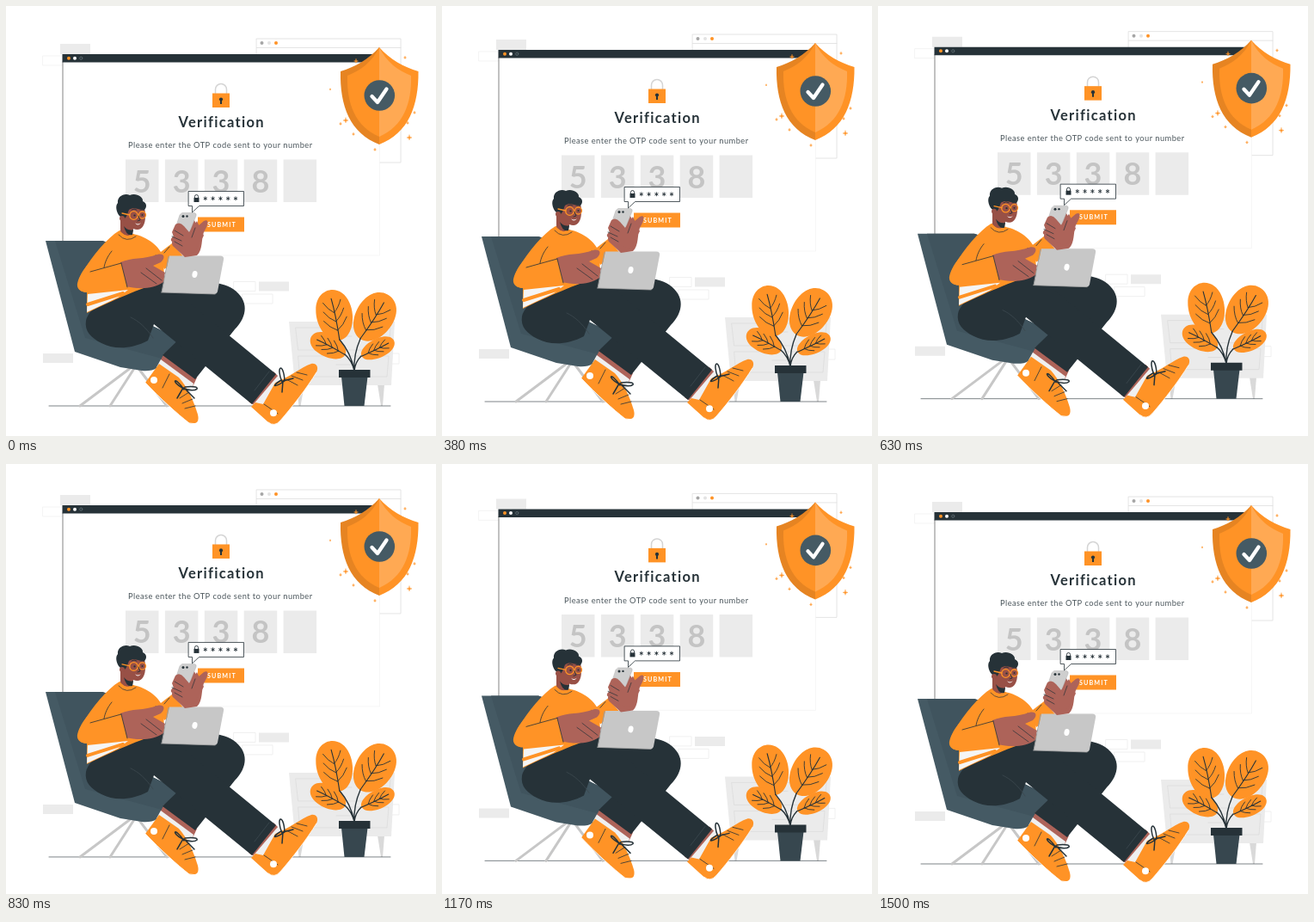
An HTML page with a canvas for the animation above (1.54 s loop, 500x500 px).

```html
<!DOCTYPE html>
<html lang="en">
<head>
<meta charset="utf-8">
<title>Verification</title>
<style>
html, body { margin: 0; width: 100%; height: 100%; overflow: hidden; background: #fff; }
canvas { display: block; width: 100vw; height: 100vh; }
</style>
</head>
<body>
<canvas id="stage" width="500" height="500"></canvas>
<script>
const ctx = document.getElementById('stage').getContext('2d');
const ORANGE = '#ff9326', DARK_ORANGE = '#e68422', LIGHT_ORANGE = '#ffa953';
const INK = '#263238', SLATE = '#37474f', BLUE = '#455a64';
const PALE = '#ebebeb', LINE = '#ececec', GREY = '#c7c7c7';
const SKIN = '#ad6359', FACE = '#985046';
const FRAME = 1000 / 24, HALF = 18, LIFT = 10, PHASE = 0.75, LOOP = 1540;

function shape(d, fill, stroke, width = 1) {
  const path = new Path2D(d);
  if (fill) { ctx.fillStyle = fill; ctx.fill(path); }
  if (stroke) {
    ctx.strokeStyle = stroke;
    ctx.lineWidth = width;
    ctx.stroke(path);
  }
}
const line = (d, color, width) => shape(d, null, color, width);

function rect(x, y, w, h, fill, stroke, width) {
  shape(`M${x} ${y}h${w}v${h}h${-w}Z`, fill, stroke, width);
}

function dot(x, y, r, fill, stroke, width = 1) {
  ctx.beginPath();
  ctx.arc(x, y, r, 0, 7);
  if (fill) { ctx.fillStyle = fill; ctx.fill(); }
  if (stroke) { ctx.strokeStyle = stroke; ctx.lineWidth = width; ctx.stroke(); }
}

function text(str, x, y, font, color, spacing = 0, align = 'left') {
  ctx.font = font + ' Lato, sans-serif';
  ctx.letterSpacing = spacing + 'px';
  ctx.textAlign = align;
  ctx.fillStyle = color;
  ctx.fillText(str, x, y);
}

function backdrop() {
  rect(63, 44, 35, 12, PALE);
  rect(43, 58, 23, 11, null, LINE, 0.6);
  rect(43, 404, 35, 11, PALE);
  rect(291.5, 38, 167.5, 144, '#fff', '#dedede', 0.8);
  line('M291.5 48.5H459', '#dedede', 0.8);
  dot(297.5, 43, 2, '#a6a6a6');
  dot(306, 43, 2, '#e3e3e3');
  dot(314, 43, 2, ORANGE);
  rect(265, 320.5, 25, 11, null, LINE, 0.8);
  rect(275, 335, 35, 11, null, LINE, 0.8);
  rect(430, 404, 27, 12, null, LINE, 0.8);
}

function page() {
  rect(66, 60, 368.5, 230, '#fff');
  line('M434.5 65V290H66', LINE, 0.5);
  line('M66 65V290', '#777', 0.9);
  rect(65.5, 56, 369.5, 9.5, INK);
  dot(73, 60.7, 2, ORANGE);
  dot(80, 60.7, 2, '#fff');
  dot(87.3, 60.7, 1.6, null, '#66747a', 0.8);
  rect(294, 320.5, 35, 11, PALE);

  line('M243.5 102V97A6.5 6.5 0 0 1 256.5 97V102', '#d4d4d4', 1.5);
  rect(240, 101.5, 20, 16.5, ORANGE);
  dot(250, 108.5, 2.1, INK);
  rect(249, 109, 2, 5, INK);

  text('Verification', 200.5, 141, '700 16.5px', INK, 1.3);
  text('Please enter the OTP code sent to your number', 142, 165.3, '9.3px', '#4a555b', 0.45);
  ['5', '3', '3', '8', ''].forEach((digit, i) => {
    const x = 139 + i * 45.9;
    rect(x, 178.5, 38.5, 49.5, PALE);
    text(digit, x + 19.2, 216.5, '700 36px', '#c4c4c4', 0, 'center');
  });
  rect(223, 245.5, 54, 17, ORANGE);
  text('SUBMIT', 234, 256.7, '700 7.2px', '#fff', 1.1);
}

function bubble() {
  shape('M212.5 215.5H276.5V232.5H224.5L216.5 240V232.5H212.5Z', '#fff', INK, 0.8);
  rect(218.5, 223, 6, 5, INK);
  line('M219.5 223V221.5A2 2 0 0 1 223.5 221.5V223', INK, 0.9);
  for (let i = 0; i < 5; i++) {
    const x = 231.8 + i * 8.8;
    for (let a = 0; a < 3; a++) {
      const c = 2 * Math.cos(a * Math.PI / 3 + 0.52), s = 2 * Math.sin(a * Math.PI / 3 + 0.52);
      line(`M${x - c} ${223.8 - s}L${x + c} ${223.8 + s}`, INK, 0.9);
    }
  }
}

function shield() {
  const sparkles = [[395, 133, 3], [469, 153, 3], [389, 137, 1.5], [464, 60, 1.5], [475, 124, 1.5],
    [407, 64, 2.5], [404, 149, 1.5], [467, 136, 1.5], [429, 167, 1.5], [377, 97, 1]];
  for (const [x, y, r] of sparkles)
    shape(`M${x} ${y - r}Q${x} ${y} ${x + r} ${y}Q${x} ${y} ${x} ${y + r}Q${x} ${y} ${x - r} ${y}Q${x} ${y} ${x} ${y - r}Z`, ORANGE, ORANGE, 0.4);
  shape('M434 48C422 62 405 71 389 76C388 116 400 148 434 161Z', DARK_ORANGE);
  shape('M434 48C446 62 463 71 479.5 76C480 116 468 148 434 161Z', ORANGE);
  shape('M434 48C426 65 412 75 397 81C396 113 406 140 434 152Z', ORANGE);
  shape('M434 48C442 65 456 75 471 81C472 113 462 140 434 152Z', LIGHT_ORANGE);
  dot(434.3, 104, 17.8, BLUE);
  line('M425.5 105L432 112L442.5 96.5', '#fff', 4.3);
}

function cabinet() {
  shape('M338 440H347L342.5 465H340.5Z M432 440H440L438 465H436Z', '#d9d9d9');
  shape('M329 367H452L448 441H336Z', PALE);
  line('M337 374H447L445 400H340Z M340 407H445L443 431H342Z', '#dadada', 0.7);
  line('M384 384H402M384 417H400', '#dadada', 0.8);
}

// An egg-shaped leaf with its tip pointing up before rotation.
function leaf(x, y, rx, ry, angle) {
  ctx.save();
  ctx.translate(x, y);
  ctx.rotate(angle);
  shape(`M0 ${ry}C${-rx * 0.75} ${ry} ${-rx * 1.2} ${ry * 0.25} ${-rx} ${-ry * 0.35}`
    + `C${-rx * 0.75} ${-ry * 1.2} ${rx * 0.75} ${-ry * 1.2} ${rx} ${-ry * 0.35}`
    + `C${rx * 1.2} ${ry * 0.25} ${rx * 0.75} ${ry} 0 ${ry}Z`, ORANGE);
  line(`M0 ${ry}Q${rx * 0.08} 0 0 ${-ry * 0.65}`, INK, 1.1);
  for (let i = 0; i < 3; i++) {
    const base = ry * (0.6 - i * 0.35), reach = rx * (0.68 - i * 0.08);
    for (const side of [-1, 1])
      line(`M0 ${base}Q${side * reach * 0.6} ${base - ry * 0.15} ${side * reach} ${base - ry * 0.45}`, INK, 0.8);
  }
  ctx.restore();
}

function plant() {
  leaf(382, 359.5, 20, 30, -0.2);
  leaf(428.5, 361.5, 21, 30.5, 0.58);
  leaf(374.5, 395, 12.5, 22.5, -1.08);
  leaf(432.5, 398, 10.5, 21, 1.12);
  line('M388 388Q401 403 405 424M412 387Q404 405 405 424M394 405Q402 412 405 424M413 407Q406 414 405 424', INK, 1.4);
  shape('M390 431H420.5L416.5 465H393.5Z', SLATE);
  rect(387, 423, 36.5, 9, INK);
}

function chair() {
  line('M146 420L86 465M150 420L121 465M153 420L187 465', GREY, 3);
  shape('M46 273H112Q119 274 120 281L146 360L207 390L175 421Q169 425 158 424L133 420L80 402Z', BLUE);
  shape('M57 273H112Q119 274 120 281L146 360L207 390L185 411L92 386Z', '#40545e');
}

function shoes() {
  shape('M184 404L222 432L217 443L178 415Z', SKIN);
  shape('M180 411L218 439L215 450L175 420Z', '#f0f0f0');
  shape('M178 416L201 432C210 442 218 458 223 475C225 483 222 487 213 485C199 474 180 457 162 438Z', ORANGE);
  line('M162 438C180 457 199 474 213 485L223 486', '#fff', 0.9);
  line('M190 428L182 444M202 456L213 449M205 462L217 457M208 468L220 465', INK, 0.8);
  dot(172, 435, 4, '#fff');
  line('M207 446C195 429 192 437 205 444C222 452 232 440 208 443M206 444L199 456M207 444L219 456', INK, 1.5);

  shape('M311 425L317 431L291 466L282 460Z', SKIN);
  shape('M316 430L324 436L299 470L287 464Z', '#f0f0f0');
  shape('M313 438C329 432 343 420 355 416C361 415 364 420 361 426C350 444 333 466 319 482Q312 490 305 484L285 466L290 461L299 463Z', ORANGE);
  line('M361 426C350 444 333 466 319 482Q312 490 305 484', '#fff', 0.8);
  line('M300 463L316 474M326 434L339 441M332 430L345 435M338 426L350 429', INK, 0.8);
  dot(311, 473.3, 4, '#fff');
  line('M321 437C313 418 323 414 324 436C314 443 306 444 320 435M322 436L334 433M322 436L321 449', INK, 1.5);
}

function legs() {
  shape('M185 338C210 319 246 317 264 329C283 342 281 361 266 376L220 434L182 406L215 374Z', INK);
  shape('M93 366C96 350 127 332 158 319C180 312 195 323 207 340L314 428L286 463L172 370L165 389C146 399 126 400 111 392C99 386 91 378 93 366Z', INK);
  line('M145 362C154 366 163 374 171 386M289 447L306 425', '#3d4a50', 0.8);
}

function torso() {
  shape('M132 261C117 270 101 290 88 311C81 324 83 333 94 333L94 357C118 345 145 333 184 319L183 292C177 276 160 267 147 265Z', ORANGE);
  shape('M95 335L142 330L130 339L94 356Z', '#f5f5f5');
  line('M95 347L136 334', ORANGE, 4);
  shape('M176 289L193 276L206 291L184 306Z', ORANGE);
  line('M184 287L190 280M174 290L181 292', INK, 0.8);
  shape('M133 298C146 292 160 295 176 289C184 287 186 293 180 298L171 302L185 310L183 321C171 330 152 329 139 326Z', SKIN);
  line('M163 305L181 319M157 310L175 323', INK, 0.7);
  shape('M112 284C98 294 82 315 83 326C85 335 100 333 114 331L141 327L134 299L119 303Z', ORANGE);
  line('M123 285C118 291 115 298 114 304M134 299L98 309M134 299L141 327', INK, 0.8);
}

function head() {
  shape('M133 239L133 262Q140 270 147 265L148 259C158 263 162 254 162 245C163 236 159 230 148 230Z', FACE);
  line('M132 263Q140 272 148 266', ORANGE, 2.2);
  line('M131 266Q140 276 151 268', INK, 0.7);
  shape('M137 256Q142 262 148 260L147 266Q140 268 137 256Z', INK);
  shape('M131 243C127 236 128 231 130 229C129 222 137 217 144 220C151 217 160 222 159 227C164 229 164 234 161 237C154 237 148 233 143 237C141 242 140 247 136 248Z', INK);
  dot(135, 247, 3, FACE);
  dot(148.5, 243.5, 4.8, null, ORANGE, 1.3);
  dot(158.5, 243, 4, null, ORANGE, 1.3);
  line('M135 241L144 243', ORANGE, 1.3);
  dot(149.5, 243.5, 1.1, INK);
  dot(158.5, 243, 1, INK);
  line('M146 237Q149 235 152 237M156 237L161 237M154 244L156 249L153 250', INK, 0.9);
  shape('M150 252Q153 255 157 252Q153 257 150 252Z', '#fff');
}

function devices() {
  shape('M190 290.5H249Q254 290.5 253 295L246 332Q245 335 242 335L181 333Z', GREY);
  line('M189 291.5L181 333', '#9b9b9b', 1);
  line('M181 333L243 335', '#a8a8a8', 0.8);
  ctx.beginPath();
  ctx.ellipse(219.5, 312, 3, 4, 0.2, 0, 7);
  ctx.fillStyle = '#fff';
  ctx.fill();

  shape('M203 265C195 269 191 274 194 279L208 292L222 290C229 284 227 270 230 263C236 253 236 247 230 250L223 256L217 246L210 256Z', SKIN);
  shape('M205 240.5H219Q222 241 221 244L211 269Q210 271 207 271H196Q193 270 194 267L202 243Z', '#cecece', '#aaa', 0.4);
  dot(206, 244.5, 1.5, INK);
  dot(210.5, 244.5, 1.2, INK);
  shape('M197 254Q202 250 207 256L213 263L222 250L230 267L218 287L205 283L192 273Q191 270 195 268L193 263Z', SKIN);
  line('M196 261L206 267M193 268L204 273M220 258L216 269M196 274L205 279', INK, 0.7);
}

function scene() {
  backdrop();
  page();
  shield();
  cabinet();
  line('M50 465H447', INK, 0.6);
  plant();
  chair();
  shoes();
  legs();
  torso();
  head();
  devices();
  bubble();
}

// The whole scene floats up and down linearly, in 24 steps a second.
const wave = step => LIFT * (1 - Math.abs(1 - (step + PHASE) % (2 * HALF) / HALF));

function liftAt(ms) {
  return wave(Math.floor((ms + 5) / FRAME)) - wave(0);
}

function render() {
  ctx.setTransform(1, 0, 0, 1, 0, 0);
  ctx.fillStyle = '#fff';
  ctx.fillRect(0, 0, 500, 500);
  ctx.lineCap = ctx.lineJoin = 'round';
  ctx.translate(0, -liftAt((performance.now() - start) % LOOP));
  scene();
  requestAnimationFrame(render);
}

const start = performance.now();
render();
</script>
</body>
</html>
```
